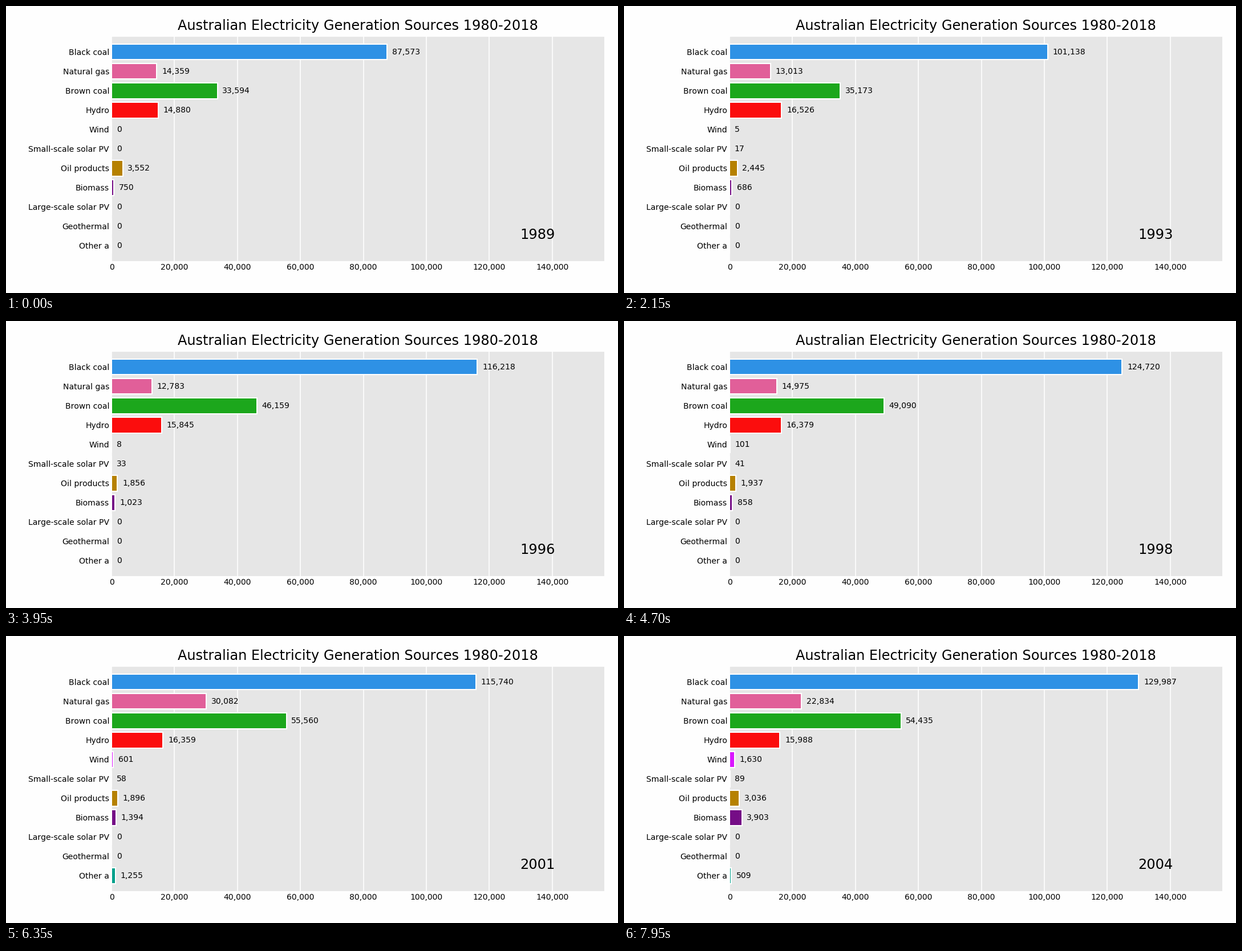
These frames come from a looping animation (1073 by 504 pixels, 8000 ms). A matplotlib script:

```python
import numpy as np
import matplotlib.pyplot as plt
from matplotlib.animation import FuncAnimation

W, H, DPI = 1073, 504, 144
FIRST_YEAR, STEPS = 1989, 10
FRAMES, INTERVAL = 160, 50

plt.rcParams["font.family"] = "DejaVu Sans"
plt.rcParams["text.kerning_factor"] = 6

# Key points: years since FIRST_YEAR, and GWh at each of them
KEY_TIMES = [0, 1.8, 4.3, 7.9, 11, 12, 12.7, 15.9]
FLAT = [0] * len(KEY_TIMES)
SOURCES = [
    ("Black coal", "#2E91E5",
     [87573, 93362, 101138, 116218, 133788, 120000, 115740, 129987]),
    ("Natural gas", "#E15F99",
     [14359, 11461, 13013, 12783, 17314, 25500, 30082, 22834]),
    ("Brown coal", "#1CA71C",
     [33594, 34857, 35173, 46159, 52216, 54300, 55560, 54435]),
    ("Hydro", "#FB0D0D",
     [14880, 15835, 16526, 15845, 16948, 16054, 16359, 15988]),
    ("Wind", "#DA16FF", [0, 0, 5, 8, 201, 364, 601, 1630]),
    ("Small-scale solar PV", "#222A2A", [0, 9, 17, 33, 49.5, 54, 58, 89]),
    ("Oil products", "#B68100",
     [3552, 2569, 2445, 1856, 2023, 1850, 1896, 3036]),
    ("Biomass", "#750D86", [750, 690, 686, 1023, 683, 870, 1394, 3903]),
    ("Large-scale solar PV", "#EB663B", FLAT),
    ("Geothermal", "#511CFB", FLAT),
    ("Other a", "#00A08B", [0, 0, 0, 0, 0, 0, 1255, 509]),
]
names, colors, curves = zip(*SOURCES)


def values_at(frame):
    return [np.interp(frame / STEPS, KEY_TIMES, curve) for curve in curves]


# Axes box in pixels, measured from the top left
LEFT, RIGHT, TOP, BOTTOM = 185.12, 1048.8, 53.672, 448.188
X_MAX = 156506
LABEL_GAP = 1573

fig = plt.figure(figsize=(W / DPI, H / DPI), dpi=DPI, facecolor="#fefefe")
ax = fig.add_axes([LEFT / W, 1 - BOTTOM / H,
                   (RIGHT - LEFT) / W, (BOTTOM - TOP) / H], facecolor="0.9")
ax.set_title("Australian Electricity Generation Sources 1980-2018", fontsize=12)

rows = range(len(names))
bars = ax.barh(rows, values_at(0), height=0.8, color=colors,
               edgecolor="white", linewidth=1, tick_label=names)
labels = [ax.text(0, y, "", fontsize=7, ha="left", va="center") for y in rows]
year = ax.text(901 / W, 1 - 409 / H, "", fontsize=12, ha="left",
               va="baseline", transform=fig.transFigure)

ax.set_xlim(0, X_MAX)
ax.set_ylim(len(names) - 0.2, -0.8)
ax.set_xticks(range(0, 140001, 20000))
ax.xaxis.set_major_formatter("{x:,.0f}")
ax.tick_params(labelsize=7, length=0, pad=2)
ax.grid(True, axis="x", color="white", linewidth=0.8)
ax.set_axisbelow(True)
for spine in ax.spines.values():
    spine.set_visible(False)


def update(frame):
    for y, (bar, label, v) in enumerate(zip(bars, labels, values_at(frame))):
        bar.set_width(v)
        label.set_position((v + LABEL_GAP, y))
        label.set_text(f"{v:,.0f}")
    year.set_text(str(FIRST_YEAR + frame // STEPS))
    return [*bars, *labels, year]


anim = FuncAnimation(fig, update, frames=FRAMES, interval=INTERVAL,
                     init_func=lambda: update(0), repeat=True, repeat_delay=0)
plt.show()
```
